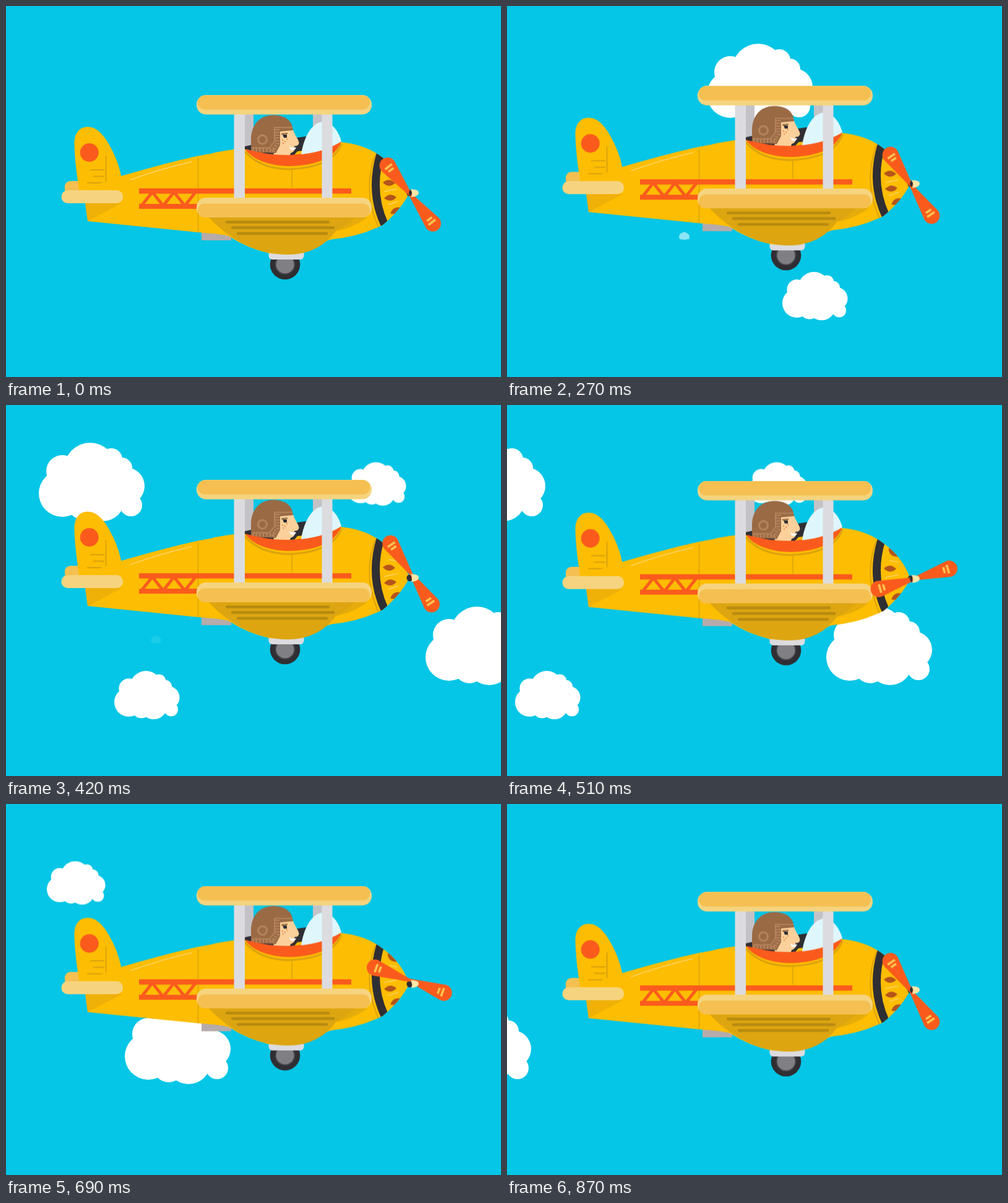
An HTML page for the animation above (900 ms loop, 800 px wide and 600 px high).

```html
<!DOCTYPE html>
<html lang="en">
<head>
<meta charset="utf-8">
<title>Biplane</title>
<style>
  html, body { margin: 0; width: 100%; height: 100%; overflow: hidden; background: #05c6e6; }
  svg { display: block; width: 100vw; height: 100vh; }

  .cloud, .plane, .prop, .puff { animation: 900ms -4ms infinite; }
  .cloud { animation-name: fly; animation-timing-function: steps(30); }
  .plane { animation-name: bob; animation-timing-function: steps(15); }
  .prop { animation-name: spin; }
  .puff { animation-name: puff; }

  @keyframes fly { to { transform: translateX(-1620px); } }
  @keyframes bob {
    0%, 100% { transform: translateY(0); }
    50% { transform: translateY(-24.6px); }
  }
  @keyframes spin {
    0% { transform: rotate(-40deg); animation-timing-function: steps(1); }
    3.3333% { transform: rotate(36deg); animation-timing-function: steps(29); }
    100% { transform: rotate(1080deg); }
  }
  @keyframes puff {
    0% { transform: translate(322px, 358px); opacity: 0; animation-timing-function: steps(1); }
    13.3333% { transform: translate(322px, 358px); opacity: 1; animation-timing-function: steps(11); }
    50%, 100% { transform: translate(225px, 374.5px); opacity: 0; }
  }

  .yellow { fill: #fdbd02; }
  .orange { fill: #fa5b1d; }
  .dark { fill: #2f2e33; }
  .light { fill: #f6d47f; }
  .tan { fill: #f5c051; }
  .strut { fill: #dcdce0; }
  .back { fill: #c3c3c7; }
  .seed { fill: #b5541c; }
  .line, .glow, .slot, .stitch { fill: none; stroke-width: var(--w, 2); }
  .line { stroke: #dba20f; }
  .glow { stroke: #fcd567; stroke-linecap: round; }
  .slot { stroke: #b88a10; stroke-linecap: round; --w: 4.5; }
  .stitch { stroke: #b5845c; }
</style>
</head>
<body>
<svg viewBox="0 0 800 600" preserveAspectRatio="none">
  <defs>
    <g id="cloud" fill="#fff">
      <circle cx="83" cy="42" r="42"/>
      <circle cx="38" cy="46" r="26"/>
      <circle cx="38" cy="82" r="38"/>
      <circle cx="71" cy="99" r="25"/>
      <circle cx="103" cy="91" r="36"/>
      <circle cx="149" cy="101" r="18"/>
      <circle cx="141" cy="70" r="30"/>
      <circle cx="117" cy="27" r="18"/>
      <circle cx="134" cy="41" r="17"/>
      <circle cx="95" cy="75" r="45"/>
    </g>
    <path id="body" d="M126 296 L186 275 Q290 245 330 239 Q350 234 368 232 Q460 222 541 220 C572 223 592 233 607 244 Q638 265 652 302 Q638 330 609 354 Q570 374 522 378 L400 374 L310 366 L132 348 Z"/>
    <clipPath id="hull"><use href="#body"/></clipPath>
    <path id="seed" class="seed" d="M-10 0 Q0 -9.5 10 0 Q0 9.5 -10 0 Z"/>
    <g id="blade">
      <path class="orange" d="M-2.5 0 L-13 -57 A13.2 13.2 0 1 1 13 -57 L2.5 0 Z"/>
      <path d="M-7 -57 H7 M-5 -50.5 H5" stroke="#fbc850" stroke-width="3.4"/>
    </g>
  </defs>

  <rect width="800" height="600" fill="#05c6e6"/>
  <g class="cloud"><use href="#cloud" transform="translate(809 61)"/></g>
  <g class="cloud"><use href="#cloud" transform="translate(931 430) scale(.617)"/></g>
  <g class="cloud"><use href="#cloud" transform="translate(1308 92.5) scale(.553)"/></g>
  <g class="cloud"><use href="#cloud" transform="translate(1434 326)"/></g>
  <g class="puff"><use href="#cloud" transform="scale(.1)"/></g>

  <g class="plane">
    <rect x="316" y="360" width="48" height="19" fill="#b5abaa"/>

    <!-- tail -->
    <rect class="tan" x="95" y="283" width="50" height="22" rx="9"/>
    <path class="yellow" d="M118.500 300 Q111 252 110.500 224 C110 205 119 195.500 132 195.500 C147 195.500 158 209 166 223 Q181 249 186 274 V300 Z"/>
    <circle class="orange" cx="134.700" cy="237" r="15"/>
    <path class="line" d="M161.500 242 V298 M136 265 H159 M141 275.500 H159 M131 286 H159"/>

    <!-- cockpit back -->
    <path class="back" d="M386 172 H400 V236 H386 Z M496 172 H511 V225 H496 Z"/>

    <!-- fuselage -->
    <use href="#body" class="yellow"/>
    <path d="M128 319 H187 L132 348 Z" fill="#efb008"/>
    <path class="line" style="--w:1.5" d="M310.500 246 V366 M462 262 V294"/>
    <path class="glow" style="--w:1.5" d="M201 281 Q255 262 300 252"/>
    <g clip-path="url(#hull)">
      <path class="line" d="M597 240 Q575 300 603 360"/>
      <path d="M605 240 Q587 300 612 354" fill="none" stroke="#2f2e33" stroke-width="13"/>
      <use href="#seed" transform="translate(624 260) rotate(42)"/>
      <use href="#seed" transform="translate(619 286) rotate(3)"/>
      <use href="#seed" transform="translate(621 310) rotate(-5)"/>
      <use href="#seed" transform="translate(630 331) rotate(-28)"/>
      <path class="glow" style="--w:1.5" d="M612 300 L632 296 M618 321 L633 316 M619 273 L632 275"/>
    </g>
    <path class="orange" d="M215 295 H558 V303.500 H215 Z M215 320 H312 V328 H215 Z"/>
    <path d="M219 323 L236.500 301 L254 323 L271.500 301 L289 323 L306.500 301" fill="none" stroke="#fa5b1d" stroke-width="5"/>

    <!-- cockpit and pilot -->
    <path class="dark" d="M386 227 L400 224 L470 213 L484 211 L492 213 L488 240 Q430 250 386 232 Z"/>
    <path class="yellow" d="M464 243 L471 235 L480 234 V243 Z"/>
    <path d="M430 244 L438 228 L441 200 H464 C466 208 474 217 473.500 222 Q472 227 466 226.500 L467 231 Q466 236 460 238 L458 244 Z" fill="#fbd09a"/>
    <path d="M396 236 V216 C396 193 409 176.500 432 176.500 C452 176.500 463 186 464 201 L443 203 V225 L436 238 Z" fill="#9a6a45"/>
    <circle class="stitch" style="--w:3" cx="414.500" cy="216" r="7"/>
    <path class="stitch" style="--w:6" d="M398 233 H433" stroke-dasharray="2.500 3"/>
    <path class="stitch" style="--w:7" d="M438.500 199 V222 L430 237" stroke-dasharray="2 2.500"/>
    <path class="stitch" d="M398 229.500 H426 L434 219 V196.500 H463"/>
    <path class="dark" d="M447 208 H454 V213 H449 Z"/>
    <path d="M445 207 L455 206" stroke="#8b5d3c" stroke-width="2"/>
    <path d="M446 217 h2 M450 219 h2 M447 222 h2 M453 215 h2" stroke="#f08a4b" stroke-width="2"/>
    <path d="M457 226 Q461 231 469 228.500 Q467 235 460 232 Z" fill="#fff"/>
    <path class="line" style="--w:3" d="M386 235 Q410 263 456 264 Q527 262 542 223"/>
    <path class="orange" d="M386 231 Q425 242 460 241 Q515 236 542 219 Q527 258 456 259 Q405 257 386 231 Z"/>
    <path d="M477 240 C482 207 497 188 512 187 C528 188 538 204 542 219 Q515 236 477 240 Z" fill="#dff6fd"/>

    <!-- gear -->
    <circle class="dark" cx="451" cy="418" r="24.300"/>
    <circle cx="451" cy="418" r="15.500" fill="#807f83" stroke="#434247" stroke-width="2"/>
    <rect class="strut" x="424.500" y="392" width="57" height="18" rx="6"/>

    <!-- belly -->
    <path class="yellow" d="M312 340 V362 L360 372 Q390 392 426 400 L456 402 L524 378 L540 340 Z"/>
    <path d="M520 342 H584 Q556 362 528 364 Z" fill="#e6ac0c"/>
    <path d="M326 340 C344 360 390 402 456 402 C496 402 520 382 533 364 Q546 358 566 340 Z" fill="#dda510"/>
    <path class="slot" d="M357 349.500 H521 M366 358.500 H529 M375 368 H518"/>

    <!-- wings and struts -->
    <path class="strut" d="M368.500 172 H386 V314 H368.500 Z M510.500 172 H527.500 V314 H510.500 Z"/>
    <rect class="light" x="308" y="144" width="283" height="31.500" rx="15"/>
    <rect class="tan" x="310" y="144.500" width="278" height="23" rx="11.500"/>
    <rect class="light" x="308" y="310" width="283" height="32" rx="15"/>
    <rect class="tan" x="310" y="319.500" width="278" height="22.500" rx="11"/>
    <rect class="light" x="89.500" y="298" width="99.500" height="21" rx="10"/>

    <!-- propeller -->
    <circle class="dark" cx="653" cy="302.500" r="5.500"/>
    <g transform="translate(653.8 300.4)">
      <g class="prop">
        <g transform="translate(-3.2 3.1) rotate(2)">
          <use href="#blade"/>
          <use href="#blade" transform="rotate(180)"/>
        </g>
      </g>
    </g>
    <path class="dark" d="M655 298 A4 4.500 0 0 0 655 307 Z"/>
    <path d="M653.500 296.500 Q667 296 667 302 Q667 308 654.500 309 Q658.500 303 653.500 296.500 Z" fill="#fae6a8"/>
  </g>
</svg>
</body>
</html>
```
